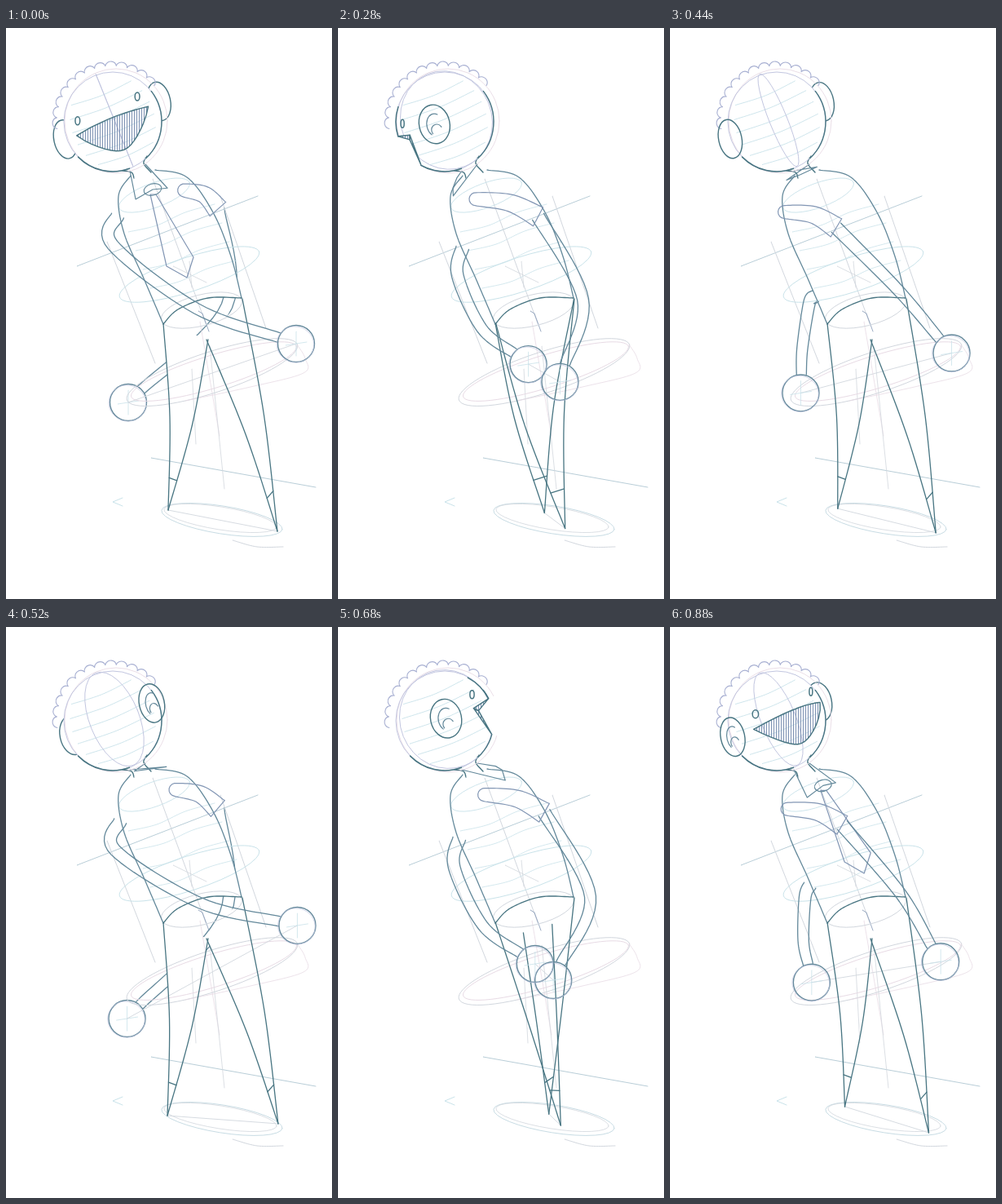
An HTML page with a canvas for the animation above (980 ms loop, 400x700 px).

```html
<!DOCTYPE html>
<html lang="en">
<head>
<meta charset="utf-8">
<title>Turnaround sketch</title>
<style>
html, body { margin: 0; width: 100%; height: 100%; overflow: hidden; background: #fff; }
canvas { display: block; width: 400px; height: 700px; }
</style>
</head>
<body>
<canvas id="stage" width="400" height="700"></canvas>
<script>
const ctx = document.getElementById('stage').getContext('2d');
const LOOP = 980, STEP = 40, COUNT = 23, HALF = COUNT / 2;
const INK = '#64899b', DARK = '#487582', BLUE = '#8296b4';
const CYAN = '#c9e3ea', PINK = '#e8dbe5', GREY = '#d2d7de', LILAC = '#c2c6e0';
const HEAD = [131, 115], RADIUS = 60, TILT = -0.385, PALM = 22.5;
const { sin, cos, abs, min, max, hypot, atan2, PI } = Math;

const mix = (a, b, t) => a + (b - a) * t;
const lerp = (p, q, t) => [mix(p[0], q[0], t), mix(p[1], q[1], t)];
const add = (p, x, y) => [p[0] + x, p[1] + y];
const rad = deg => deg * PI / 180;
const range = n => Array.from({ length: n }, (_, i) => i);
const turn = f => f / COUNT * 2 * PI;
function smoothstep(from, to, v) {
  const t = min(1, max(0, (v - from) / (to - from)));
  return t * t * (3 - 2 * t);
}

// Hands and feet ride tilted ellipses; the third harmonic gives the uneven pace.
function sway(f) {
  const a = turn(f);
  return (86 * cos(a) + 17 * cos(3 * a) + 5 * sin(a) + 19 * sin(3 * a)) / 103;
}
const depth = f => sin(turn(f)) + 0.45 * sin(3 * turn(f));
const handAt = f => [253 + 103 * sway(f), 423 - 36 * sway(f) - 25 * depth(f)];
const footAt = f => [266 - 67 * sway(f), 604 - 13 * sway(f) + 10 * depth(f)];

function smooth(points, steps = 12) {
  const at = i => points[min(max(i, 0), points.length - 1)];
  const out = [points[0]];
  for (let i = 0; i < points.length - 1; i++) {
    for (let k = 1; k <= steps; k++) {
      const t = k / steps;
      out.push([0, 1].map(j => {
        const [a, b, c, d] = [at(i - 1)[j], at(i)[j], at(i + 1)[j], at(i + 2)[j]];
        return b + t / 2 * (c - a + t * (2 * a - 5 * b + 4 * c - d + t * (3 * (b - c) + d - a)));
      }));
    }
  }
  return out;
}

function trace(points, closed) {
  ctx.beginPath();
  points.forEach(p => ctx.lineTo(...p));
  if (closed) ctx.closePath();
}
function stroke(color, width) {
  ctx.strokeStyle = color;
  ctx.lineWidth = width;
  ctx.stroke();
}
function line(points, color = INK, width = 1.2, closed = false) {
  trace(points, closed);
  stroke(color, width);
}
const curve = (points, color = INK, width = 1.3) => line(smooth(points), color, width);
function oval([x, y], rx, ry, tilt = 0, color = INK, width = 1.2, from = 0, to = 360) {
  ctx.beginPath();
  ctx.ellipse(x, y, rx, ry, rad(tilt), rad(from), rad(to));
  stroke(color, width);
}
function mask(points) {
  trace(points, true);
  ctx.fillStyle = '#fff';
  ctx.fill();
}
function clipped(points, draw) {
  ctx.save();
  trace(points, true);
  ctx.clip();
  draw();
  ctx.restore();
}

// The two edges of a tapering limb around a centre line.
function tube(points, startWidth, endWidth) {
  const mid = smooth(points), last = mid.length - 1;
  return [-1, 1].map(side => mid.map((p, i) => {
    const a = mid[max(0, i - 1)], b = mid[min(last, i + 1)];
    const dx = b[0] - a[0], dy = b[1] - a[1], len = hypot(dx, dy) || 1;
    const w = side * mix(startWidth, endWidth, i / last);
    return add(p, -dy / len * w, dx / len * w);
  }));
}

const TORSO_LEFT = smooth([[153, 181], [138, 206], [145, 252], [169, 307], [193, 363]]);
const TORSO_RIGHT = smooth([[183, 174], [222, 183], [254, 226], [276, 280], [289, 331]]);
const BELT = smooth([[193, 363], [211, 345], [248, 331], [289, 331]]);
const TORSO = [...TORSO_LEFT, ...BELT, ...[...TORSO_RIGHT].reverse()];

function legAt(f) {
  // An edge sits at the crotch in front and back views, at the hip in profile.
  const inner = g => smoothstep(0, 0.6, cos(turn(g - 1.1)));
  const a = inner(f + HALF), b = inner(f), foot = footAt(f);
  const bend = 5 - 12 * (1 - a) * (1 - b);
  const edge = top => smooth([top, add(lerp(top, foot, 0.5), bend, 0), foot]);
  return [edge(lerp([193, 362], [246, 382], a)), edge(lerp([290, 332], [248, 382], b))];
}

function armAt(f) {
  const g = (f + HALF) % COUNT - HALF, hand = handAt(g);
  const reach = (...points) => {
    const elbow = points[points.length - 1];
    const gap = hypot(hand[0] - elbow[0], hand[1] - elbow[1]);
    return [...points, lerp(hand, elbow, PALM / gap)];
  };
  if (g < 0) {
    const u = g / HALF + 1;
    const shoulder = [137 - 7.1 * g, 199 + 29 * u * u];
    const cuff = [260 - 64 * u ** 3, 222 + 25 * u * u];
    const elbow = add(lerp(cuff, hand, 0.5), 66 * (1 - u * u), 0);
    const crown = add(lerp(shoulder, cuff, 0.5), 4, -6);
    return { hand, far: g < -6, path: reach(cuff, elbow), sleeve: [shoulder, crown, cuff] };
  }
  const v = g / HALF;
  const y = 230 + 60 * v + 55 * v ** 6;
  const root = [137 + (y - 230) * 0.4, y];
  const elbow = add(root, -6, 36 * (1 - v ** 6));
  const angle = atan2(hand[1] - elbow[1], hand[0] - elbow[0]);
  const sag = 20 * (1 - v ** 4);
  const fore = add(lerp(elbow, hand, 0.5), -sin(angle) * sag, cos(angle) * sag);
  return { hand, far: false, path: reach(root, elbow, fore) };
}

function drawArm({ hand, path }) {
  tube(path, 8, 6).forEach(edge => line(edge, INK, 1.3));
  oval(hand, PALM, PALM, 0, INK, 1.4);
  oval(add(hand, -1, 1), 23, 22, 20, LILAC, 0.7);
  line([add(hand, -13, 2), add(hand, 13, -2)], CYAN, 0.8);
  line([add(hand, 0, -15), add(hand, 0, 15)], CYAN, 0.8);
}

function drawSleeve(points) {
  const [top, bottom] = tube(points, 8, 13), [x, y] = points[0];
  const a = atan2(top[0][1] - y, top[0][0] - x);
  const cap = range(9).map(i => [x + 8 * cos(a - i * PI / 8), y + 8 * sin(a - i * PI / 8)]);
  line([...[...top].reverse(), ...cap, ...bottom], BLUE, 1.2, true);
}

function drawGuides(f) {
  line([[87, 292], [309, 206]], '#b9ced8', 1);
  line([[178, 527], [380, 563]], '#b9ced8', 1);
  line([[124, 262], [183, 411]], GREY, 1);
  line([[263, 206], [319, 368]], GREY, 1);
  line([[180, 185], [245, 362]], GREY, 1);
  line([[236, 347], [241, 350], [249, 372]], BLUE, 0.8);
  line([[228, 418], [233, 510]], GREY, 0.8);
  line([[238, 360], [262, 500]], PINK, 0.8);
  line([[250, 390], [268, 565]], GREY, 0.8);
  oval([265, 603], 75, 17, 9, '#c8dce4', 1);
  oval([263, 601], 70, 14, 9, GREY, 0.8);
  oval([253, 422], 110, 25, -18, GREY, 1);
  oval([255, 421], 106, 20, -17, PINK, 1);
  curve([[357, 388], [367, 405], [365, 423], [300, 440], [220, 457]], PINK, 0.8);
  oval([225, 302], 90, 21, -18, CYAN, 1);
  oval([240, 346], 51, 19, -14, GREY, 1);
  oval([182, 205], 46, 15, -20, CYAN, 0.9);
  range(4).forEach(i => {
    const p = [150 + i * 9, 250 + i * 23];
    curve([p, add(p, 35, -8), add(p, 70, -24), add(p, 106, -34)], CYAN, 0.8);
  });
  line([[205, 292], [246, 312]], GREY, 0.8);
  line([[225, 286], [228, 318]], GREY, 0.8);
  line([[143, 576], [131, 581], [143, 586]], CYAN, 1);
  curve([[278, 628], [308, 636], [340, 636]], GREY, 1);
  line([handAt(f), handAt(f + HALF)], GREY, 0.9);
  line([footAt(f), footAt(f + HALF)], GREY, 0.9);
}

function drawCollar(f) {
  const a = turn(f), c = cos(a);
  const ring = (b, rx, y, ry) => [172 - rx * sin(b) + 8 * cos(b), y + ry * cos(b) + 12 * sin(b)];
  const knot = ring(a, 30, 188, 10);
  const flap = side => ring(a + side * rad(35), 34, 190, 16);
  if (c > 0.1) clipped(TORSO, () => {
    const tip = [222 - 60 * sin(a), 306 + 15 * sin(a)];
    line([add(knot, -3, 6), add(tip, -25 * c, -14), tip, add(tip, 8, -25), add(knot, 4, 6)], BLUE, 1.2, true);
  });
  if (c > 0.3) oval(knot, 10 * c + 1, 7, -15, INK, 1.1);
  line([[152, 175], flap(1), knot, flap(-1), [171, 167]], INK, 1.2);
}

function drawBody(f, legs) {
  curve([[143, 175], [154, 177], [157, 184]], DARK, 1.4);
  curve([[173, 157], [169, 166], [178, 177]], DARK, 1.4);
  line(TORSO_LEFT, INK, 1.3);
  line(TORSO_RIGHT, INK, 1.3);
  line(BELT, DARK, 1.3);
  legs.forEach(([a, b]) => {
    const ankle = Math.round(a.length * 0.76);
    line(a, DARK, 1.3);
    line(b, DARK, 1.3);
    line([a[ankle], b[ankle]], DARK, 1.3);
  });
  drawCollar(f);
}

// Head space: x to the right and y down the tilted axis.
const onHead = (x, y) => add(HEAD, x * cos(TILT) - y * sin(TILT), x * sin(TILT) + y * cos(TILT));
const onFace = (angle, y) => onHead(-Math.sqrt(RADIUS ** 2 - y * y) * sin(angle), y);

function drawEars(face, front) {
  [1, -1].forEach(side => {
    const near = side * sin(face);
    if (near > 0.1 !== front) return;
    const p = onHead(side * 62 * cos(face), -2), rx = 14 + 5 * near * near;
    oval(p, rx, 24, -12, DARK, 1.4);
    if (near < 0.25) return;
    oval(add(p, 1, 1), rx * 0.55, 14, -12, INK, 1.2, 130, 300);
    oval(add(p, 3, 7), rx * 0.35, 7, -12, INK, 1.2, 150, 340);
  });
}

function hatch(points) {
  clipped(points, () => {
    ctx.beginPath();
    for (let x = 70.5; x < 195; x += 3) { ctx.moveTo(x, 80); ctx.lineTo(x, 180); }
    stroke('#8094b4', 1.1);
  });
  line(points, DARK, 1.4, true);
}

function drawMouth(face) {
  const side = face > 0 ? 1 : -1;
  const lip = (s, height) => onFace(face + Math.asin(s * 0.79), height * (1 - s * s) - 1);
  const lens = (from, to) => {
    const spots = range(17).map(i => mix(from, to, i / 16));
    return [...spots.map(s => lip(s, -4)), ...spots.reverse().map(s => lip(s, 38))];
  };
  if (abs(face) < rad(45)) return hatch(lens(-1, 1));
  if (abs(face) > rad(108)) return;

  // In profile the jaws open at the rim of the head, with the gap left clear.
  const rim = (p, r) => lerp(HEAD, p, r / hypot(p[0] - HEAD[0], p[1] - HEAD[1]));
  const corner = lip(-side, 0), top = lip(0, -4), chin = lip(0, 38);
  const upper = rim(top, RADIUS), lower = rim(chin, RADIUS);
  const gap = lerp(corner, lerp(upper, lower, 0.5), 0.3);
  mask([corner, upper, rim(top, 75), rim(chin, 75), lower]);
  hatch([corner, upper, gap]);
  hatch([corner, gap, lower]);
  const brow = atan2(upper[1] - HEAD[1], upper[0] - HEAD[0]) * 180 / PI;
  oval(HEAD, RADIUS, RADIUS, 0, DARK, 1.5, min(brow, brow + side * 35), max(brow, brow + side * 35));
}

function drawHead(face) {
  oval(add(HEAD, 4, -1), 63, 64, 0, PINK, 0.9);
  oval(HEAD, RADIUS, RADIUS + 1, 0, LILAC, 1);
  range(6).forEach(i => {
    const y = i * 16 - 38, w = 0.85 * Math.sqrt(RADIUS ** 2 - y * y);
    curve([onHead(-w, y), onHead(0, y + 3), onHead(w, y)], CYAN, 0.9);
  });
  oval(add(HEAD, 2, -2), 57 * abs(sin(face)), 61, -22, LILAC, 1);

  const bumps = 13;
  ctx.beginPath();
  range(bumps).forEach(i => {
    const a = rad(172 + (i + 0.5) * 148 / bumps);
    ctx.arc(130 + 66 * cos(a), 114 + 66 * sin(a), 7, a - 1.35, a + 1.35);
  });
  stroke('#a8b0d2', 1.1);

  oval(HEAD, RADIUS, RADIUS + 1, 0, DARK, 1.5, 70, 135);
  oval(HEAD, RADIUS, RADIUS + 1, 0, DARK, 1.4, -38, 47);
  drawMouth(face);
  drawEars(face, true);
  [1, -1].forEach(side => {
    const a = face + side * rad(43.5);
    if (cos(a) > 0.3) oval(onFace(a, -17.4), max(2, 4 * cos(a)), 5, 0, DARK, 1.5);
  });
}

function drawFrame(f) {
  const a = turn(f);
  const face = atan2(sin(a + 0.21 * sin(2 * a)), cos(a + 0.21 * sin(2 * a)));
  const legs = [legAt(f), legAt(f + HALF)], arms = [armAt(f), armAt(f + HALF)];
  ctx.fillStyle = '#fff';
  ctx.fillRect(0, 0, 400, 700);
  ctx.lineCap = ctx.lineJoin = 'round';

  // Far parts come first, so the blank silhouette can cover them.
  arms.filter(arm => arm.far).forEach(drawArm);
  drawEars(face, false);
  mask(TORSO);
  legs.forEach(([left, right]) => mask([...left, ...[...right].reverse()]));
  ctx.beginPath();
  ctx.arc(...HEAD, RADIUS, 0, 2 * PI);
  ctx.fill();

  drawGuides(f);
  drawBody(f, legs);
  arms.filter(arm => !arm.far).forEach(drawArm);
  arms.filter(arm => arm.sleeve).forEach(arm => drawSleeve(arm.sleeve));
  drawHead(face);
}

const start = performance.now();
function render() {
  const t = max(0, performance.now() - start) % LOOP;
  drawFrame(min(COUNT - 1, Math.floor(t / STEP)));
  requestAnimationFrame(render);
}
render();
</script>
</body>
</html>
```
